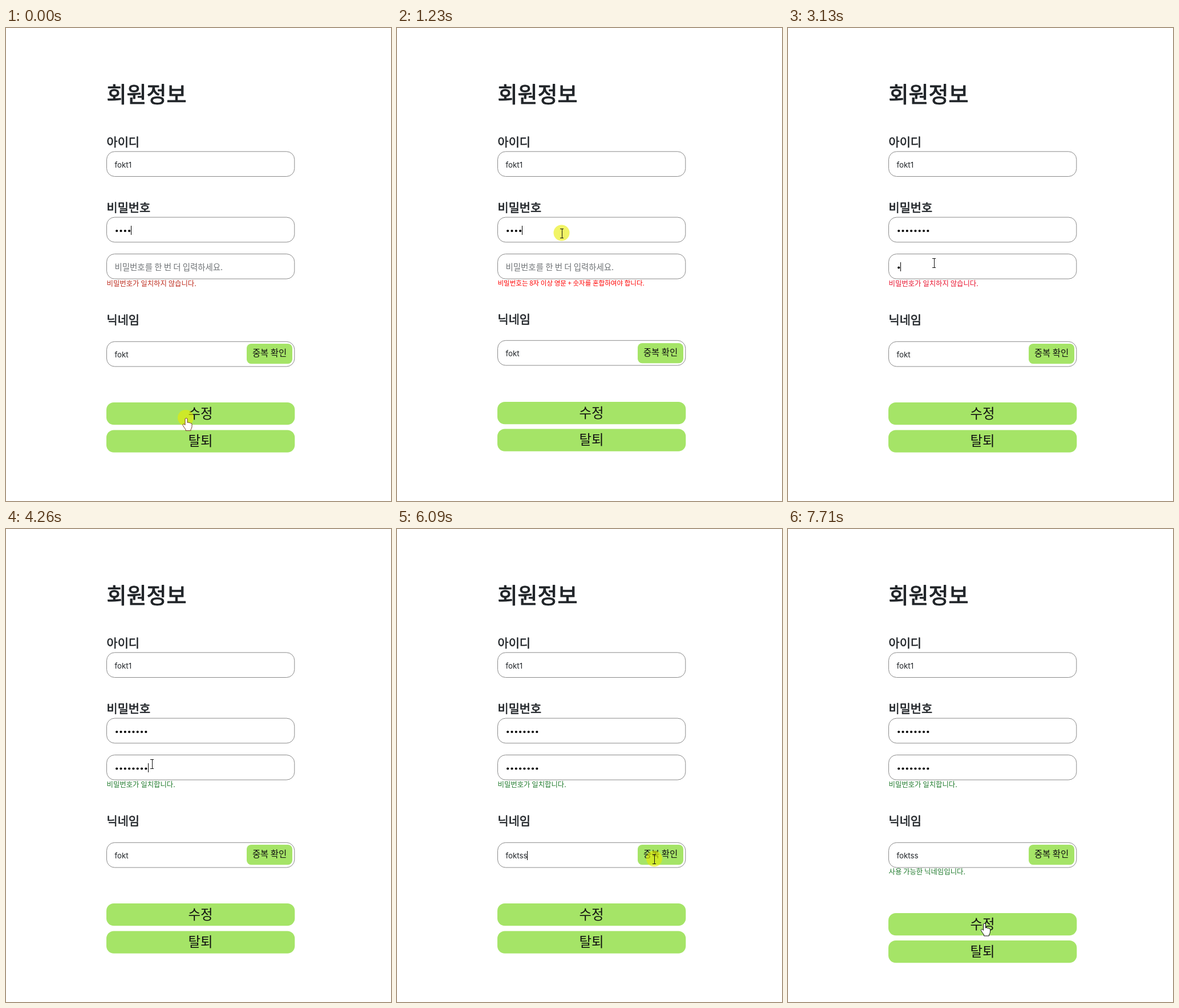
An HTML page with a canvas that plays this animation: 675 by 830 pixels, repeating every 8040 ms.

```html
<!DOCTYPE html>
<html lang="ko">
<head>
<meta charset="utf-8">
<title>회원정보</title>
<style>
html, body { margin: 0; width: 100%; height: 100%; overflow: hidden; background: #fff; }
canvas { display: block; }
</style>
</head>
<body>
<canvas id="stage" width="675" height="830"></canvas>
<script>
const ctx = document.getElementById('stage').getContext('2d');
const LOOP = 8040, STEP = 68;
const KR = '"Noto Sans CJK KR", "Noto Sans CJK", sans-serif';
const LATIN = 'Inter, sans-serif';
const GREEN = '#a5e467', INK = '#212529';

// When each character is typed
const firstTyped = [1970, 2110, 2170, 2370];
const secondTyped = [3130, 3330, 3440, 3540, 3930, 4070, 4160, 4260];
const nickTyped = [5290, 5490];

// Pointer path: time, x, y
const path = [
  [0, 316, 684.5], [340, 316, 684.5], [550, 344, 323], [620, 343, 320],
  [1090, 289.5, 360], [2440, 289.5, 360], [2800, 256.5, 412],
  [4590, 256.5, 412], [4730, 345, 455], [4930, 267.5, 579.5],
  [5630, 267.5, 579.5], [6090, 452, 579], [6160, 452, 579],
  [6430, 338, 575], [6620, 338, 575], [6760, 434, 560],
  [7170, 434, 560], [7700, 344.5, 692]
];
const presses = [[0, 70], [1230, 1280], [2800, 2930], [4930, 5070], [6020, 6160], [6960, 7030]];

const within = (t, a, b) => t >= a && t < b;
const count = (list, t) => list.filter(at => t >= at).length;

function text(str, x, y, size, color, weight = 300, family = KR, align = 'left') {
  ctx.font = `${weight} ${size}px ${family}`;
  ctx.fillStyle = color;
  ctx.textAlign = align;
  ctx.fillText(str, x, y);
}

// Semi-bold: regular glyphs thickened by a thin outline
function heading(str, y, size) {
  text(str, 176.5, y, size, INK, 400);
  ctx.strokeStyle = INK;
  ctx.lineWidth = size * 0.03;
  ctx.lineJoin = 'round';
  ctx.strokeText(str, 176.5, y);
}

function box(x, y, w, h, r, fill, stroke) {
  ctx.beginPath();
  ctx.roundRect(x, y, w, h, r);
  ctx.fillStyle = fill;
  ctx.fill();
  if (stroke) {
    ctx.strokeStyle = stroke;
    ctx.lineWidth = 1;
    ctx.stroke();
  }
}

const field = y => box(176.5, y - 0.2, 329.3, 43.7, 14, '#fff', '#8a8a8a');

function button(label, y) {
  box(176, y, 330.3, 39.3, 13, GREEN);
  text(label, 341, y + 27.5, 23.4, '#111', 300, KR, 'center');
}

function dots(n, y) {
  ctx.fillStyle = '#000';
  for (let i = 0; i < n; i++) {
    ctx.beginPath();
    ctx.arc(194.2 + i * 7.3, y, 2.1, 0, Math.PI * 2);
    ctx.fill();
  }
}

function caret(x, y) {
  ctx.fillStyle = '#000';
  ctx.fillRect(Math.floor(x), y, 1, 16);
}

function pointerAt(t) {
  const i = path.findLastIndex(k => t >= k[0]);
  const [t0, x0, y0] = path[i];
  if (i === path.length - 1) return [x0, y0];
  const [t1, x1, y1] = path[i + 1];
  const p = Math.floor((t - t0) / STEP) * STEP / (t1 - t0);
  return [x0 + (x1 - x0) * p, y0 + (y1 - y0) * p];
}

function outline(shape, x, y, color) {
  ctx.save();
  ctx.translate(x, y);
  ctx.fillStyle = '#fff';
  ctx.strokeStyle = color;
  ctx.lineWidth = 1;
  ctx.lineJoin = 'round';
  ctx.fill(shape);
  ctx.stroke(shape);
  ctx.restore();
}

const arrow = new Path2D('M0 0V15.5L3.6 12.2L6 17.6L8.4 16.6L6 11.3H10.8Z');
const hand = new Path2D('M-2 1.2Q0-1 2 1.2V8Q3.5 6.6 5 8.4Q6.8 7.4 7.7 9.2Q9.7 8.5 10 10.8V15Q9.8 18 8 20V22H-1V20Q-3.5 17-5.8 12.8Q-6.6 11.4-5.4 10.6Q-4.2 9.4-2 12.2Z');

function beam(x, y) {
  x = Math.round(x);
  y = Math.round(y);
  ctx.fillStyle = '#111';
  ctx.fillRect(x - 1, y - 7, 1, 15);
  for (const dy of [-8, 8]) ctx.fillRect(x - 4, y + dy, 6, 1);
}

function pointer(t, nickY, buttonYs) {
  const [x, y] = pointerAt(t);
  const held = presses.some(([a, b]) => within(t, a, b));
  if (held) {
    ctx.fillStyle = 'rgba(232, 236, 0, 0.6)';
    ctx.beginPath();
    ctx.arc(x - 1, y - 0.5, 14, 0, Math.PI * 2);
    ctx.fill();
  }
  const dragging = within(t, 5630, 6430);
  const inRow = (top, h) => x > 176 && x < 506 && y >= top && y < top + h;
  const onCheck = x > 422 && x < 502 && y > nickY + 3 && y < nickY + 39;
  if (!dragging && (onCheck || buttonYs.some(b => inRow(b, 40)))) {
    outline(hand, x, y, held ? '#74401c' : '#111');
  } else if (dragging || [217, 332, 397, nickY].some(f => inRow(f, 43))) {
    beam(x, y);
  } else {
    outline(arrow, x, y, '#222');
  }
}

function carets(t, first, second, extra) {
  const after = n => 190.6 + n * 7.3;
  if (t < 70 || within(t, 1230, 1770) || within(t, 1970, 2870)) caret(after(first), 347);
  else if (within(t, 2870, 4930)) caret(after(second), 411);
  else if (within(t, 4930, 6300)) caret(214 + extra * 7, 565);
}

function message(t) {
  if (within(t, 70, 1970)) {
    text('비밀번호는 8자 이상 영문 + 숫자를 혼합하여야 합니다.', 176.5, 452, 11.55, '#ff0000');
  } else if (t < 4260) {
    text('비밀번호가 일치하지 않습니다.', 176.5, 452.5, 12.4, t < 70 ? '#bd2a1c' : '#e8112d');
  } else {
    text('비밀번호가 일치합니다.', 176.5, 452.5, 12.4, '#1f7a2c');
  }
}

function draw(t) {
  const lifted = within(t, 70, 1970);
  const checked = t >= 7100;
  const first = 4 + count(firstTyped, t);
  const second = count(secondTyped, t);
  const extra = count(nickTyped, t);
  const nickY = lifted ? 548.5 : 550.5;
  const checkY = lifted ? 553 : 554;
  const buttonYs = checked ? [674, 722] : lifted ? [656, 703.5] : [657, 705.5];

  ctx.fillStyle = '#fff';
  ctx.fillRect(0, 0, 675, 830);

  heading('회원정보', 130, 38);
  heading('아이디', 207.5, 20.8);
  heading('비밀번호', 322.5, 20.8);
  heading('닉네임', lifted ? 518.5 : 519.5, 20.8);

  [217, 332.3, 396.7, nickY].forEach(field);
  text('fokt1', 190.5, 244.5, 13.3, INK, 400, LATIN);
  dots(first, 356);
  if (second) dots(second, 420.5);
  else text('비밀번호를 한 번 더 입력하세요.', 190.5, 424.5, 14.45, '#6f7376');
  message(t);

  text('fokt' + 's'.repeat(extra), 190.5, nickY + 27.5, 13.3, INK, 400, LATIN);
  box(422, checkY, 80, 35.3, 8, GREEN);
  text('중복 확인', 462, checkY + 22, 15.4, '#111', 300, KR, 'center');
  if (checked) text('사용 가능한 닉네임입니다.', 176.5, 606, 12.4, '#1f7a2c');

  button('수정', buttonYs[0]);
  button('탈퇴', buttonYs[1]);
  carets(t, first, second, extra);
  pointer(t, nickY, buttonYs);
}

const start = performance.now();
function tick() {
  draw((performance.now() - start) % LOOP);
  requestAnimationFrame(tick);
}
tick();
</script>
</body>
</html>
```
